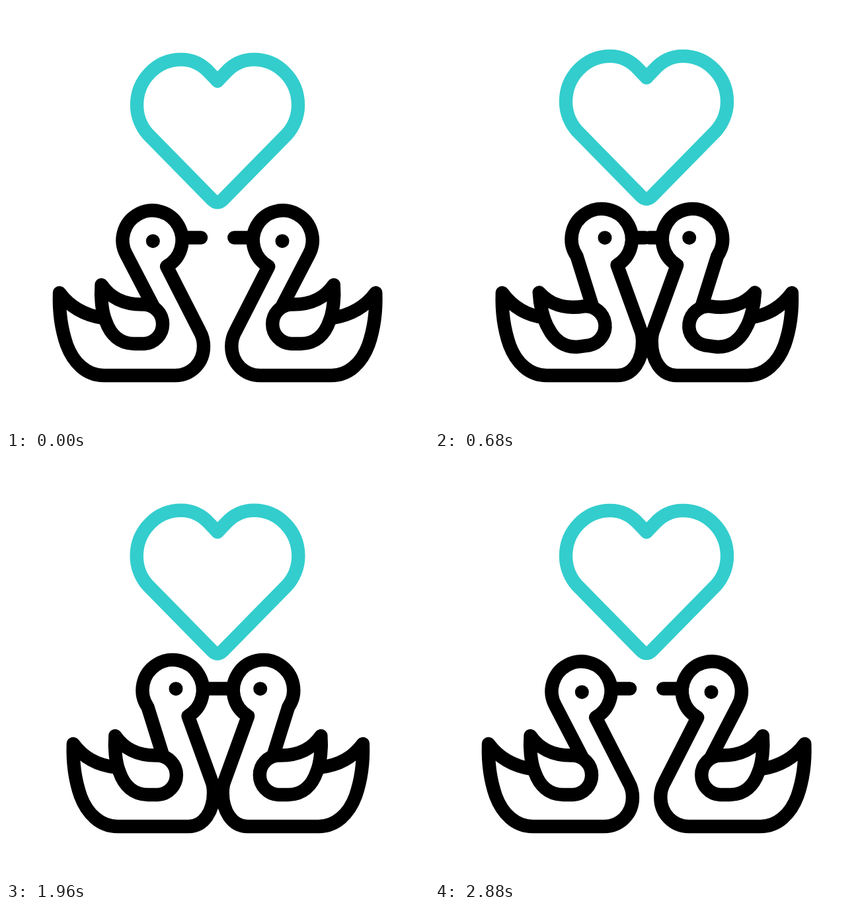
Recreate the animation shown at these times as an HTML page with a canvas. Size 640 px wide and 640 px high, loop 3 s.

```html
<!DOCTYPE html>
<html lang="en">
<head>
<meta charset="utf-8">
<title>Swans in love</title>
<style>
  html, body { margin: 0; width: 100%; height: 100%; overflow: hidden; background: #fff; }
  canvas { display: block; width: 640px; height: 640px; }
</style>
</head>
<body>
<canvas id="stage" width="640" height="640"></canvas>
<script>
const ctx = document.getElementById('stage').getContext('2d');
const LOOP = 3000, STEP = 40, SHIFT = 20.8;
const BLACK = '#000', TEAL = '#33cdcd';

const mix = (a, b, k) => a + (b - a) * k;

// Smooth 0..1 between two times
function ease(t, from, to) {
  const p = Math.min(1, Math.max(0, (t - from) / (to - from)));
  return (1 - Math.cos(Math.PI * p)) / 2;
}

// Smooth bump: up from start to peak, back down to end
const bump = (t, start, peak, end) => ease(t, start, peak) * (1 - ease(t, peak, end));

// Rhythmic beats within a window, each one 320 ms long, the last one weaker
function beat(t, from, to) {
  if (t < from || t > to) return 0;
  const size = to - t < 320 ? 0.033 : 0.049;
  return size * Math.abs(Math.sin(Math.PI * (t - from) / 320)) ** 3;
}

function line(d) {
  ctx.stroke(new Path2D(d));
}

const heartHalf = `M320 113.5L308 101C299 91 285 81 265 81C228 81 198 112 198 150
  C198 167 205 183 214.8 194L312 293C315 296 317 297 320 297`;

function drawHeart(t) {
  const scale = 1 + beat(t, 960, 1600) + beat(t, 1920, 2880);
  ctx.save();
  ctx.translate(320, 189 - 10.3 * bump(t, 80, 480, 880));
  ctx.scale(scale, scale);
  ctx.translate(-320, -189);
  ctx.strokeStyle = TEAL;
  line(heartHalf);
  ctx.translate(640, 0);
  ctx.scale(-1, 1);
  line(heartHalf);
  ctx.restore();
}

const wing = new Path2D(`M144.5 422C143 440 145 463 151 477C158 497 172 511 194 511
  H209A29.8 29.8 0 0 0 209 451.5C176 452.5 157 440 144.5 422Z`);

// k: 0 apart, 1 together; press: beaks pushed together; flap: 0..1
function drawSwan(k, press, flap) {
  const at = (x0, y0, x1, y1) => `${mix(x0, x1, k)} ${mix(y0, y1, k)} `;
  const left = (x, y) => at(x, y, x + SHIFT, y);
  const lift = 4 * press;
  const radius = mix(45, 45.7, k);

  ctx.strokeStyle = ctx.fillStyle = BLACK;
  line('M' + at(146, 472, 166, 473.5 - lift)
    + 'C' + at(115, 467, 135, 470 - lift) + left(95, 453) + left(81, 434)
    + 'C' + left(80, 462) + left(84, 490) + left(92, 513)
    + 'C' + left(102, 540) + left(122, 559) + left(148, 559)
    + 'L' + at(256, 559, 276, 559)
    + 'C' + at(280, 559, 300, 559) + at(299, 540, 314, 535) + at(299, 515, 314, 508)
    + 'C' + at(299, 507, 314, 502) + at(297, 499, 313, 495) + at(293, 492, 311, 490)
    + 'L' + at(243, 394, 275.5, 392)
    + `A${radius} ${radius} 0 1 0 ` + at(182, 376, 214.5, 378.5)
    + 'L' + at(222, 453, 237.5, 452));
  line('M' + at(267, 350.5, 299, 350.5) + 'L' + at(295, 350.5, 316 + 3.5 * press, 350.5));

  ctx.beginPath();
  ctx.arc(mix(222.3, 257, k), mix(355.7, 350.7, k), 10.5, 0, 2 * Math.PI);
  ctx.fill();

  ctx.save();
  ctx.translate(SHIFT * k + 229, 486);
  ctx.rotate(-0.135 * flap);
  ctx.translate(-229, -486);
  ctx.fillStyle = '#fff';
  ctx.fill(wing);
  ctx.stroke(wing);
  ctx.restore();
}

function draw(t) {
  ctx.fillStyle = '#fff';
  ctx.fillRect(0, 0, 640, 640);
  ctx.lineWidth = 20.4;
  ctx.lineCap = ctx.lineJoin = 'round';

  drawHeart(t);

  const k = ease(t, 80, 440) * (1 - ease(t, 2480, 2880));
  const press = ease(t, 480, 880) * (1 - ease(t, 2120, 2480));
  const flap = bump(t, 320, 640, 960) + bump(t, 2120, 2440, 2760);
  drawSwan(k, press, flap);
  ctx.save();
  ctx.translate(mix(640.3, 641.7, k), 0);
  ctx.scale(-1, 1);
  drawSwan(k, press, flap);
  ctx.restore();
}

function tick() {
  const t = performance.now() % LOOP;
  draw(Math.floor(t / STEP) * STEP);
  requestAnimationFrame(tick);
}
tick();
</script>
</body>
</html>
```
